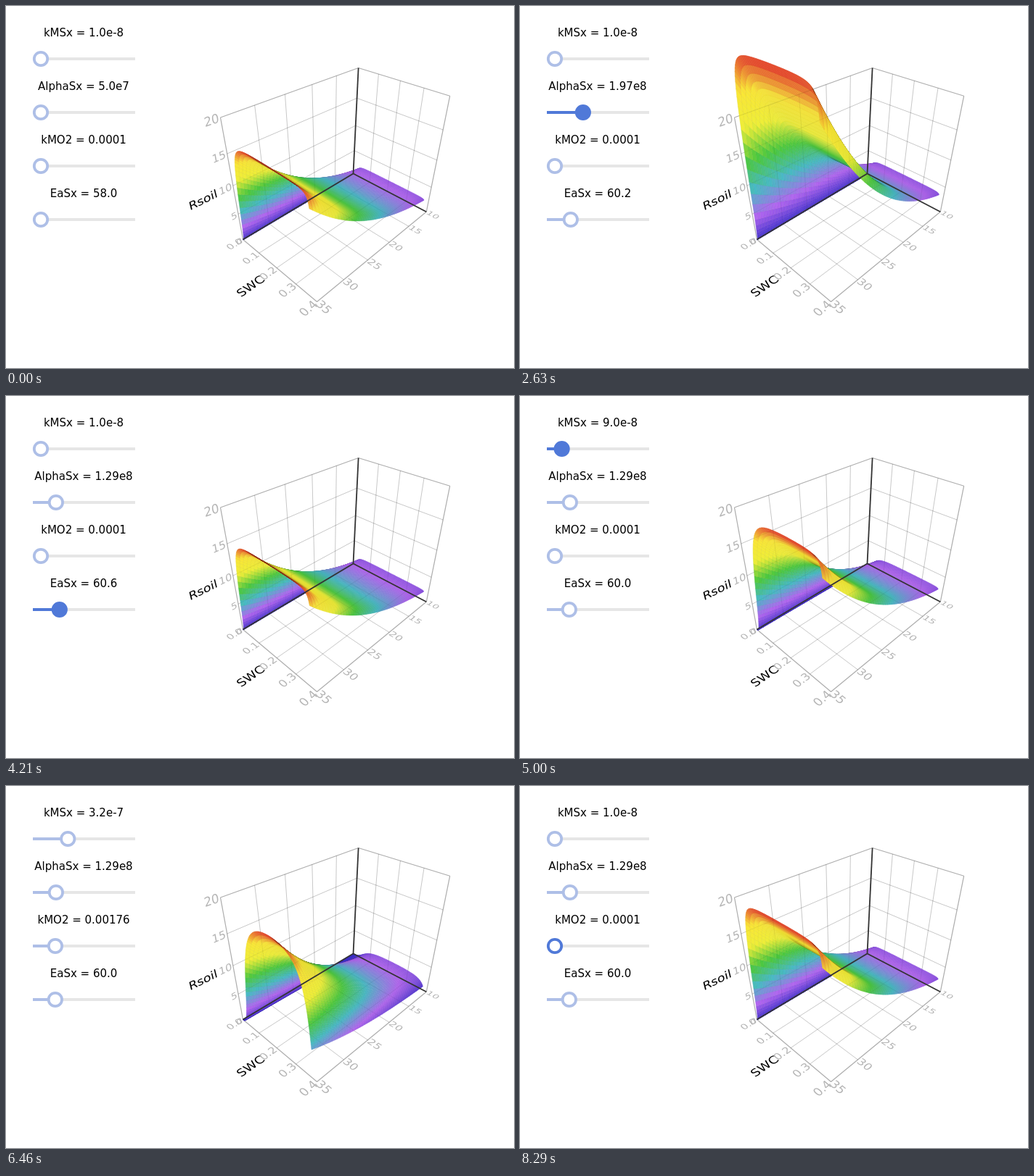
Write an HTML page with a canvas that moves like this. It is 700x500 px and loops after 8.33 s.

```html
<!DOCTYPE html>
<html lang="en">
<head>
<meta charset="utf-8">
<title>Soil respiration surface</title>
<style>
  html, body { margin: 0; width: 100%; height: 100%; overflow: hidden; background: #fff; }
  canvas { display: block; width: 700px; height: 500px; }
</style>
</head>
<body>
<canvas id="stage" width="700" height="500"></canvas>
<script>
const ctx = document.getElementById('stage').getContext('2d');
const LOOP = 8330, STEP = LOOP / 200;
const FONT = '"DejaVu Sans", sans-serif';

const sci = v => {
  const [m, e] = v.toExponential(2).split('e');
  return m.replace(/0$/, '') + 'e' + Number(e);
};

// keys: [time, value]; touches: [hover from, press from, press to, hover to]
const sliders = [
  { name: 'kMSx', min: 1e-8, max: 1e-6, step: 1e-8, format: sci,
    keys: [[4880, 1e-8], [5220, 3.2e-7], [6620, 3.2e-7], [7180, 1e-8]],
    touches: [[4790, 4880, 5240, 5320], [6500, 6600, 7290, 7400]] },
  { name: 'AlphaSx', min: 5e7, max: 5e8, step: 1e6, format: sci,
    keys: [[100, 5e7], [330, 5.4e7], [600, 5e7], [2060, 5e7], [2620, 1.97e8], [2840, 1.85e8], [3250, 1.29e8]],
    touches: [[40, 100, 600, 690], [1920, 2040, 3400, 3450]] },
  { name: 'kMO2', min: 1e-4, max: 0.01, step: 2e-5, format: v => String(+v.toFixed(5)),
    keys: [[5460, 1e-4], [5580, 0.0026], [5700, 0.00756], [5830, 0.0085], [6300, 0.00176],
           [7600, 0.00176], [7800, 0.006], [8190, 1e-4]],
    touches: [[5400, 5460, 6300, 6420], [7480, 7600, 8220, LOOP]] },
  { name: 'EaSx', min: 58, max: 70, step: 0.2, format: v => v.toFixed(1),
    keys: [[1130, 58], [1680, 60.2], [3740, 60.2], [3960, 62], [4200, 60.6], [4380, 59], [4540, 60]],
    touches: [[830, 960, 1700, 1880], [3600, 3740, 4520, 4600]] }
];

function valueAt({ keys, min, step }, time) {
  let value = keys[0][1];
  for (let i = 0; i < keys.length; i++) {
    const [t, v] = keys[i], next = keys[i + 1];
    if (time < t) break;
    value = v;
    if (next && time < next[0]) {
      const u = (time - t) / (next[0] - t);
      value += (next[1] - v) * (1 - Math.cos(Math.PI * u)) / 2;
    }
  }
  return min + Math.round((value - min) / step) * step;
}

// Perspective of a unit box: s = water content, t = temperature (35 to 10), z = respiration
function project([s, t, z]) {
  const w = 1 - 0.1604 * s + 0.2525 * t - 0.21 * z;
  return [(326 + 33.35 * s + 272.7 * t - 92.95 * z) / w + 0.5,
          (322 + 20.6 * s - 32.7 * t - 200.7 * z) / w + 0.5];
}

function line(a, b, color, width) {
  ctx.strokeStyle = color;
  ctx.lineWidth = width;
  ctx.beginPath();
  ctx.moveTo(...project(a));
  ctx.lineTo(...project(b));
  ctx.stroke();
}

function grid(alpha) {
  const ink = k => `rgba(0,0,0,${alpha * k})`;
  const thin = (a, b) => line(a, b, ink(1), 1);
  const edge = (a, b) => line(a, b, ink(1.5), 1.2);
  for (const q of [0.25, 0.5, 0.75]) {
    thin([q, 0, 0], [q, 1, 0]);
    thin([q, 1, 0], [q, 1, 1]);
    thin([0, 0, q], [0, 1, q]);
    thin([0, 1, q], [1, 1, q]);
  }
  for (let i = 1; i < 5; i++) {
    thin([0, i / 5, 0], [1, i / 5, 0]);
    thin([0, i / 5, 0], [0, i / 5, 1]);
  }
  edge([0, 0, 0], [1, 0, 0]);
  edge([1, 0, 0], [1, 1, 0]);
  edge([0, 0, 0], [0, 0, 1]);
  edge([0, 0, 1], [0, 1, 1]);
  edge([0, 1, 1], [1, 1, 1]);
  edge([1, 1, 0], [1, 1, 1]);
}

// Text lying in a plane of the box: xAxis runs along the baseline, yAxis downwards
const EM = [0.105, 0.063, 0.08];
function planeText(text, at, xAxis, yAxis, ySign, align, color, scale = 1) {
  const p = project(at);
  const along = (axis, sign) => {
    const q = at.slice();
    q[axis] += sign * 0.001;
    return project(q).map((v, i) => (v - p[i]) * 1000 * EM[axis] * scale / 20);
  };
  ctx.save();
  ctx.transform(...along(xAxis, 1), ...along(yAxis, ySign), ...p);
  ctx.font = '20px ' + FONT;
  ctx.textAlign = align;
  ctx.textBaseline = 'middle';
  ctx.fillStyle = color;
  ctx.fillText(text, 0, 1);
  ctx.restore();
}

function axisLabels() {
  const gray = '#b4b4b4', gap = 0.008;
  for (let i = 0; i < 5; i++) {
    planeText(String(i * 5), [0, -gap, i / 4], 1, 2, -1, 'right', gray);
    planeText((i / 10).toFixed(1), [i / 4, -gap, 0], 1, 0, 1, 'right', gray);
  }
  for (let i = 0; i < 6; i++) planeText(String(35 - i * 5), [1 + gap, i / 5, 0], 0, 1, -1, 'left', gray);
  planeText('Rsoil', [0, -0.18, 0.5], 1, 2, -1, 'center', '#000', 1.08);
  planeText('SWC', [0.505, -0.177, 0], 1, 0, 1, 'center', '#000', 1.08);
}

const RAINBOW = [[62, 48, 205], [178, 102, 240], [72, 186, 196], [76, 200, 62], [238, 238, 56], [250, 230, 54], [230, 52, 40]];
function rainbow(v, shade) {
  const x = Math.min(0.9999, Math.max(0, v)) * (RAINBOW.length - 1), i = Math.floor(x), f = x - i;
  return `rgb(${RAINBOW[i].map((c, k) => Math.round((c + (RAINBOW[i + 1][k] - c) * f) * shade))})`;
}

// Dual Arrhenius and Michaelis-Menten kinetics
const MAX_SWC = 0.38, POROSITY = 0.3889;
function respiration(swc, celsius, [kS, alpha, kO, ea]) {
  const vmax = alpha * Math.exp(-ea / (0.008314 * (273.15 + celsius))) * 2314.8;
  const substrate = 9.5e-4 * swc ** 3;
  const oxygen = 0.349 * (POROSITY - swc) ** (4 / 3);
  return vmax * substrate / (kS + substrate) * oxygen / (kO + oxygen);
}

const NS = 110, NT = 50;
function surface(params) {
  const heights = [], points = [];
  let top = 0;
  for (let j = 0; j <= NT; j++) {
    heights.push([]);
    points.push([]);
    for (let i = 0; i <= NS; i++) {
      // samples gather at both ends, where the surface is steep
      const u = i / NS;
      const swc = MAX_SWC * (u - 0.8 * Math.sin(2 * Math.PI * u) / (2 * Math.PI));
      const r = respiration(swc, 35 - 25 * j / NT, params);
      top = Math.max(top, r);
      heights[j].push(r);
      points[j].push(project([swc / 0.4, j / NT, r / 20]));
    }
  }
  ctx.lineWidth = 0.5;
  for (let j = NT - 1; j >= 0; j--) {
    for (let i = 0; i < NS; i++) {
      const a = points[j][i], b = points[j][i + 1], c = points[j + 1][i + 1], d = points[j + 1][i];
      const mean = (heights[j][i] + heights[j][i + 1] + heights[j + 1][i] + heights[j + 1][i + 1]) / 4 / top;
      const ex = b[0] - a[0], ey = b[1] - a[1], fx = d[0] - a[0], fy = d[1] - a[1];
      const sine = Math.abs(ex * fy - ey * fx) / (Math.hypot(ex, ey) * Math.hypot(fx, fy) + 1e-9);
      const shade = 0.6 + 0.4 * Math.min(1, sine * 6);
      ctx.fillStyle = rainbow(mean, shade);
      ctx.strokeStyle = rainbow(mean, shade * 0.94);
      ctx.beginPath();
      ctx.moveTo(...a);
      ctx.lineTo(...b);
      ctx.lineTo(...c);
      ctx.lineTo(...d);
      ctx.closePath();
      ctx.fill();
      ctx.stroke();
    }
  }
}

function drawSlider(slider, value, index, time) {
  const y = 73 + 74 * index;
  const x = 48 + 119 * (value - slider.min) / (slider.max - slider.min);
  const touch = slider.touches.find(([from, , , to]) => time >= from && time < to);
  const pressed = touch && time >= touch[1] && time < touch[2];
  const color = touch ? '#5079d8' : '#aebfe7';

  ctx.font = '15px ' + FONT;
  ctx.textAlign = 'center';
  ctx.textBaseline = 'alphabetic';
  ctx.fillStyle = '#000';
  ctx.fillText(`${slider.name} = ${slider.format(value)}`, 107, y - 31);

  ctx.fillStyle = '#e6e6e6';
  ctx.fillRect(37, y - 2, 141, 4);
  ctx.fillStyle = color;
  ctx.fillRect(37, y - 2, x - 37, 4);
  ctx.beginPath();
  ctx.arc(x, y, 9.2, 0, 2 * Math.PI);
  ctx.fillStyle = pressed ? color : '#fff';
  ctx.fill();
  ctx.strokeStyle = color;
  ctx.lineWidth = 3.8;
  ctx.stroke();
}

function draw(time) {
  ctx.fillStyle = '#fff';
  ctx.fillRect(0, 0, 700, 500);
  const values = sliders.map(s => valueAt(s, time));
  grid(0.17);
  axisLabels();
  surface(values);
  grid(0.06);
  line([0, 0, 0], [0, 1, 0], '#333', 1.8);
  line([0, 1, 0], [1, 1, 0], '#333', 1.8);
  line([0, 1, 0], [0, 1, 1], '#333', 1.8);
  sliders.forEach((s, i) => drawSlider(s, values[i], i, time));
}

const start = performance.now();
let shown = -1;
function tick() {
  const step = Math.floor(((performance.now() - start) % LOOP) / STEP + 0.05);
  if (step !== shown) draw((shown = step) % 200 * STEP);
  requestAnimationFrame(tick);
}
tick();
</script>
</body>
</html>
```
